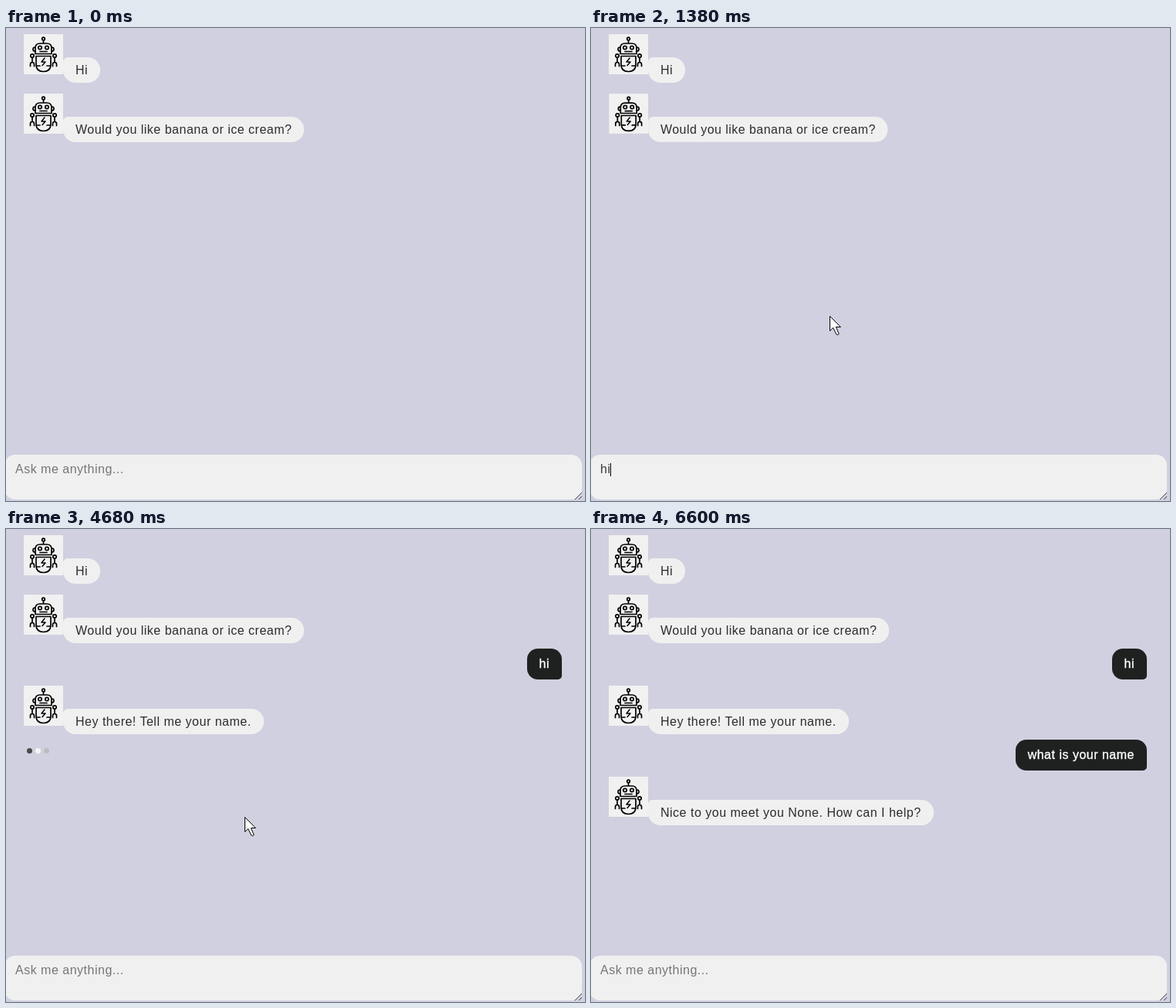
An HTML page for the animation above (7.84 s loop, 750 by 613 pixels).

```html
<!DOCTYPE html>
<html lang="en">
<head>
<meta charset="utf-8">
<title>Chat</title>
<style>
html, body { margin: 0; width: 100%; height: 100%; overflow: hidden; }
body {
  position: relative; background: #d1d0e0; color: #2c2c2c;
  font: 16px/18px "Liberation Sans", Arial, sans-serif; letter-spacing: .5px;
}
body * { box-sizing: border-box; white-space: pre; }
body > * { position: absolute; }
#log { left: 23px; right: 30px; top: 8px; }
.bot { position: relative; height: 63px; margin-bottom: 7px; }
.bot + .bot { margin-top: 14px; }
.bot > * { position: absolute; }
.avatar {
  width: 51px; height: 52px; background: #f1f1f1;
  transform-origin: 66px 30px; transform: scale(var(--pop, 1));
}
.bubble {
  left: 51px; top: 30px; height: 33px; padding: 8px 16px 7px;
  background: #f0f0f0; border-radius: 6px 16px 16px 16px;
  transform-origin: 15px 0; transform: scale(var(--grow, 1));
}
.user {
  width: fit-content; height: 40px; margin: 0 0 8px auto; padding: 11px 16px;
  background: #1f2020; color: #fff; -webkit-text-stroke: .35px #fff;
  border-radius: 14px 14px 5px 14px;
  transform-origin: 100% 0; transform: scale(var(--grow, 1));
}
#input {
  left: -2px; top: 553px; width: 748px; height: 58px; padding: 10px 14px;
  display: flex; background: #f0f0f0; border-radius: 14px;
}
#typed { color: #3a3a3a; }
#caret { width: 1px; height: 17px; margin: 1px -1px 0 0; background: #000; }
#hint { color: #757575; }
#grip { left: 737px; top: 602px; }
#status {
  left: -1px; top: 594px; width: 144px; height: 20px;
  background: #f0f0f0; border: 1px solid #c3c3c6; border-radius: 0 4px 0 0;
}
#dots { left: 27px; top: 284px; display: flex; gap: 4px; }
#dots i { width: 7px; height: 7px; border-radius: 50%; }
#pointer { left: 0; top: 0; overflow: visible; }
</style>
</head>
<body>
<svg width="0" height="0">
  <symbol id="robot" viewBox="0 0 51 52">
    <g fill="none" stroke="#000" stroke-width="1.7" stroke-linecap="round" stroke-linejoin="round">
      <circle cx="25.5" cy="6" r="1.8"/>
      <path d="M25.500 8v3M15 25.500V18q0-6 6-6h9q6 0 6 6v7.500zM21 22.500h9"/>
      <circle cx="21" cy="17.500" r="2.200"/>
      <circle cx="30" cy="17.500" r="2.200"/>
      <path d="M16 28.500h19V39q0 9.500-9.500 9.500T16 39zM16 41h5M30 41h5"/>
      <path d="M27 31l-4 5h5l-4 4.500" stroke-width="1.500"/>
      <g id="side">
        <path d="M14.500 17q-2.500 0-2.500 2.500t2.500 2.500M11 30.500V36M8.500 41.500V39q0-2.500 2.500-2.500t2.500 2.500v2.500"/>
        <circle cx="11" cy="28" r="2.200"/>
      </g>
      <use href="#side" transform="translate(51) scale(-1 1)"/>
    </g>
  </symbol>
</svg>
<div id="log"></div>
<div id="input"><span id="typed"></span><span id="caret"></span><span id="hint">Ask me anything...</span></div>
<svg id="grip" width="9" height="9"><path d="M0 9L9 0M5 9L9 5" stroke="#444"/></svg>
<div id="status"></div>
<div id="dots"><i></i><i></i><i></i></div>
<svg id="pointer" width="16" height="26">
  <path id="arrow" d="M.5.5V19.500L4.700 15.500L8.800 24Q10.500 25.500 12.200 23.500L8.300 14.500H14.300Z" fill="#fff" stroke="#000"/>
  <path id="beam" d="M-3-8.500H3M0-8V8M-3 8.500H3" fill="none" stroke="#000"/>
</svg>
<script>
const LOOP = 7840, RELOAD = 600, BLINK = 240;
const $ = id => document.getElementById(id);
const show = (el, on) => { el.style.visibility = on ? 'visible' : 'hidden'; };
const between = (t, from, to) => t >= from && t < to;
const clamp = k => Math.min(1, Math.max(0, k));
const easeOut = k => 1 - (1 - k) ** 3;
// Damped spring from 0 to 1
const bounce = k => k >= 1 ? 1 : 1 - Math.exp(-7.5 * k) * Math.cos(13.6 * k);

const messages = [
  { kind: 'bot', start: 920, text: 'Hi', greeting: true },
  { kind: 'bot', start: 1271, text: 'Would you like banana or ice cream?', greeting: true },
  { kind: 'user', start: 1715, text: 'hi', stall: 140 },
  { kind: 'bot', start: 1856, text: 'Hey there! Tell me your name.', length: 100 },
  { kind: 'user', start: 4800, text: 'what is your name' },
  { kind: 'bot', start: 5010, text: 'Nice to you meet you None. How can I help?' }
];

const words = [
  { text: 'hi', start: 1140, gap: 140 },
  { text: 'what ', start: 2680, gap: 95 },
  { text: 'is your ', start: 3280, gap: 82 },
  { text: 'name', start: 4020, gap: 55 }
];
const sends = [1860, 4240];

// Each glide rests at its end until the next one begins or the pointer leaves.
const glides = [
  { start: 100, end: 220, from: [688, 125], to: [20, 83], leave: 240 },
  { start: 560, end: 760, from: [150, 20], to: [309, 373], ease: easeOut },
  { start: 4690, end: 5320, from: [309, 373], to: [454, 530], ease: easeOut },
  { start: 5440, end: 5640, from: [454, 530], to: [570, 603] },
  { start: 5820, end: 6200, from: [570, 603], to: [640, 460] },
  { start: 6200, end: 6600, from: [640, 460], to: [722, 603], leave: 6600 }
];
const dotColors = ['#4a4a4a', '#f4f4f4', '#bdbdbd'];

for (const m of messages) {
  m.el = document.createElement('div');
  m.el.className = m.kind;
  if (m.kind === 'bot') {
    m.el.innerHTML = '<svg class="avatar"><use href="#robot"/></svg><div class="bubble"></div>';
  }
  (m.el.lastChild || m.el).textContent = m.text;
  $('log').append(m.el);
}

function drawMessage(m, t) {
  const settled = m.greeting && t < RELOAD;
  const age = t - m.start, stalled = m.stall && age < m.stall;
  const scale = settled ? 1 : stalled ? .22 : bounce(Math.max(0, age) / (m.length || 200));
  show(m.el, settled || age >= 0);
  m.el.style.setProperty('--pop', scale);
  m.el.style.setProperty('--grow', Math.min(scale, 1));
}

function typedAt(t) {
  const cleared = Math.max(0, ...sends.filter(s => s <= t));
  return words.filter(w => between(w.start, cleared, t + 1))
    .map(w => w.text.slice(0, 1 + Math.floor((t - w.start) / w.gap))).join('');
}

function drawInput(t) {
  const text = typedAt(t), focus = t < sends[1] ? 740 : 4820;
  const blinkOn = between(t, focus, 6600) && (t - focus) % (2 * BLINK) < BLINK;
  $('typed').textContent = text;
  show($('hint'), !text);
  show($('caret'), text || blinkOn);
}

function drawPointer(t) {
  const glide = glides.filter(g => g.start <= t).pop();
  const visible = glide && t < (glide.leave || LOOP);
  $('pointer').style.display = visible ? '' : 'none';
  if (!visible) return;
  const { start, end, from, to, ease = k => k } = glide;
  const k = ease(clamp((t - start) / (end - start)));
  const [x, y] = from.map((v, i) => Math.round(v + (to[i] - v) * k));
  const overInput = y > 553;
  $('pointer').style.transform = `translate(${x}px, ${y}px)`;
  $('arrow').style.display = overInput ? 'none' : '';
  $('beam').style.display = overInput ? '' : 'none';
}

function drawDots(t) {
  show($('dots'), between(t, 4460, 4800));
  $('dots').style.transform = t < 4600 ? 'translateY(-2px) scale(.5)' : '';
  const shift = Math.floor((t - 4680) / 100);
  [...$('dots').children].forEach((dot, i) => {
    dot.style.background = dotColors[((i - shift) % 3 + 3) % 3];
  });
}

function render(t) {
  messages.forEach(m => drawMessage(m, t));
  show($('status'), between(t, RELOAD, 900));
  drawInput(t);
  drawDots(t);
  drawPointer(t);
}

const begin = performance.now();
function tick() {
  render((performance.now() - begin) % LOOP);
  requestAnimationFrame(tick);
}
tick();
</script>
</body>
</html>
```
